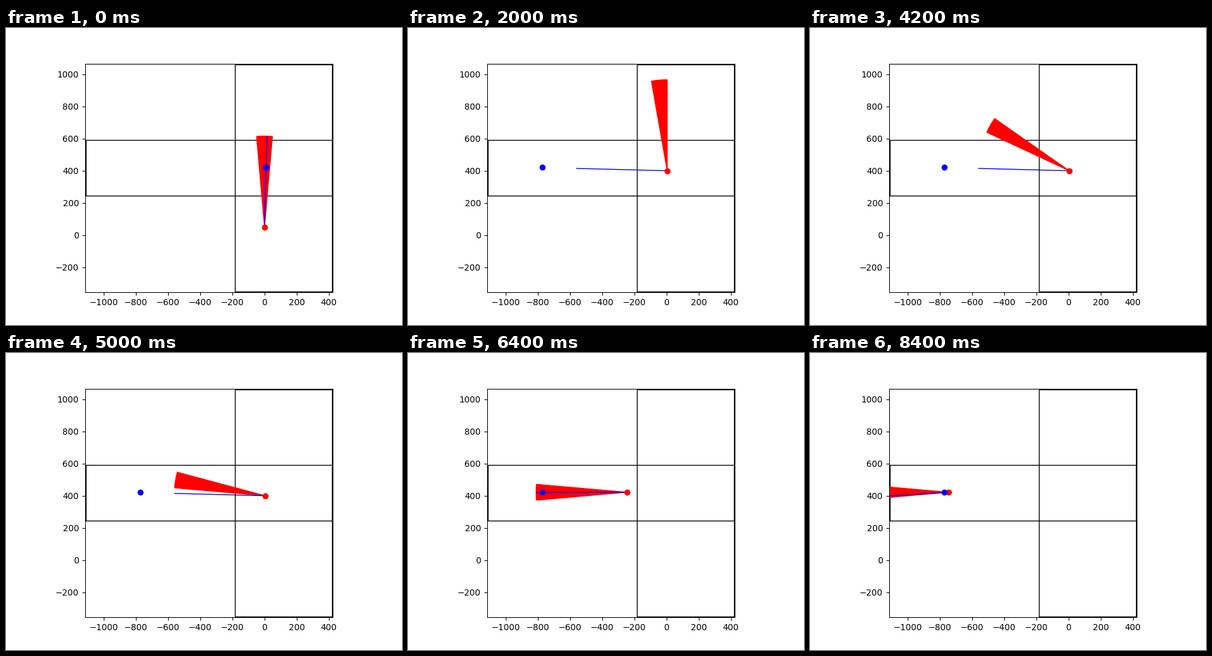
Animation, 640 px wide and 480 px high, one loop 8600 ms. Source, as a matplotlib script:

```python
import numpy as np
import matplotlib.pyplot as plt
from matplotlib.animation import FuncAnimation
from matplotlib.patches import Rectangle, Wedge

FRAMES = 43
STEP = 50        # distance walked per frame
TURN = 5         # degrees turned per frame
HALF_VIEW = 5    # half of the viewing angle
RANGE = 565
GOALS = [(10, 420), (-770, 420)]


def bearing(pos, goal):
    return np.degrees(np.arctan2(goal[1] - pos[1], goal[0] - pos[0])) % 360


def simulate():
    """Walk while the goal is in view, otherwise turn towards it."""
    pos, heading, k = np.array([0.0, 50.0]), 90, 0
    states = []
    for _ in range(FRAMES):
        states.append((tuple(pos), heading, GOALS[k]))
        if np.hypot(*(GOALS[k] - pos)) < STEP and k < len(GOALS) - 1:
            k += 1
        off = (bearing(pos, GOALS[k]) - heading + 180) % 360 - 180
        if abs(off) > HALF_VIEW:
            heading += TURN * int(np.sign(off))
        else:
            a = np.radians(heading)
            pos = pos + STEP * np.array([np.cos(a), np.sin(a)])
    return states


states = simulate()

fig, ax = plt.subplots(figsize=(6.4, 4.8), dpi=100)
ax.set_aspect("equal")
ax.set_xlim(-1115, 425)
ax.set_ylim(-355, 1065)

for x0, y0, x1, y1 in [(-185, -350, 420, 1060), (-1110, 245, 420, 590)]:
    ax.add_patch(Rectangle((x0, y0), x1 - x0, y1 - y0, fill=False, lw=1))

view = ax.add_patch(Wedge((0, 0), RANGE, 0, 1, color="red", lw=1))
sight = ax.add_patch(Wedge((0, 0), RANGE, 0, 0, color="blue", lw=1))
agent, = ax.plot([], [], "o", color="red")
target, = ax.plot([], [], "o", color="blue")


def aim(wedge, pos, low, high):
    wedge.set_center(pos)
    wedge.set_theta1(low)
    wedge.set_theta2(high)


def update(i):
    pos, heading, goal = states[i]
    angle = bearing(pos, goal)
    aim(view, pos, heading - HALF_VIEW, heading + HALF_VIEW)
    aim(sight, pos, angle, angle)
    agent.set_data([pos[0]], [pos[1]])
    target.set_data([goal[0]], [goal[1]])
    return view, sight, agent, target


anim = FuncAnimation(fig, update, frames=FRAMES, interval=200, repeat=True,
                     repeat_delay=0)
plt.show()
```
